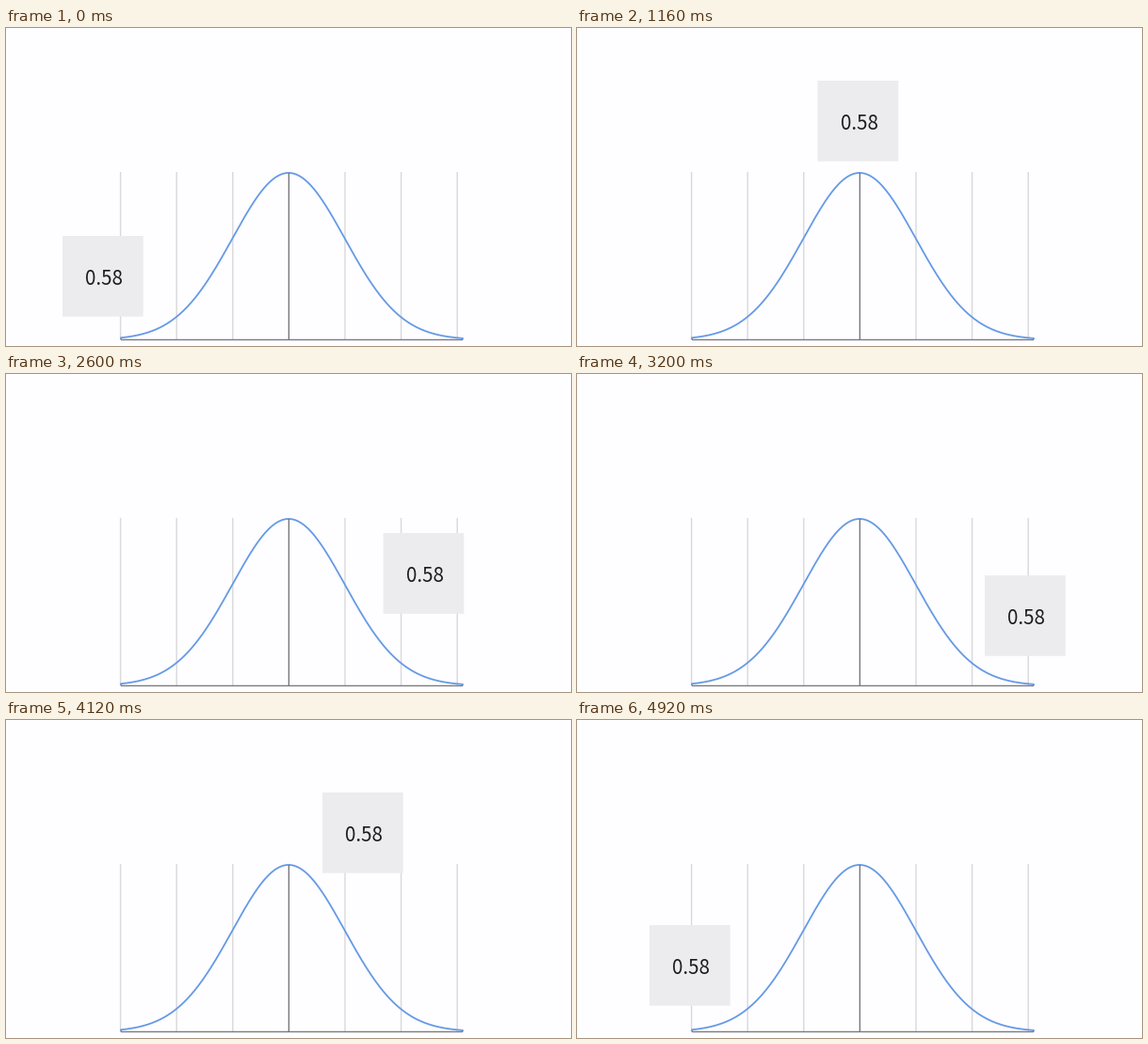
These frames come from a looping animation (600x338 px, 5.2 s). A matplotlib script:

```python
import numpy as np
import matplotlib.pyplot as plt
from matplotlib.animation import FuncAnimation
from matplotlib.patches import Rectangle

W, H, DPI = 600, 338, 100
STEP, FRAMES = 40, 130
SIDE = 85.7
BASE, PEAK, MID, SIGMA = 331.3, 154, 300.1, 59.7
LEFT, RIGHT = 122, 485
GREY, DARK, BLUE = "#d9d8db", "#77777b", "#659ae5"

# The card is dragged over the bell to the right and back: time in ms, left, top
KEYS = np.array([
    (0, 60, 221),
    (640, 186, 86),
    (1150, 254, 56),
    (1680, 347, 85),
    (2240, 388, 136),
    (2800, 408, 186),
    (3200, 433, 214),
    (3600, 463, 239),
    (4120, 336, 77),
    (4280, 273, 54),
    (4480, 200, 102),
    (4920, 77, 218),
])


def slopes(t, v):
    """Tangents that never overshoot the key values."""
    d = np.diff(v) / np.diff(t)
    a, b = d[:-1], d[1:]
    same = a * b > 0
    inner = np.where(same, 2 * a * b / np.where(same, a + b, 1), 0)
    return np.r_[d[0], inner, d[-1]]


def glide(t, v, at):
    """Cubic Hermite curve through the keys, held after the last one."""
    at = np.minimum(at, t[-1])
    m = slopes(t, v)
    i = np.clip(np.searchsorted(t, at, side="right") - 1, 0, len(t) - 2)
    h = t[i + 1] - t[i]
    s = (at - t[i]) / h
    return ((1 + 2 * s) * (1 - s) ** 2 * v[i] + s * (1 - s) ** 2 * h * m[i]
            + s * s * (3 - 2 * s) * v[i + 1] + s * s * (s - 1) * h * m[i + 1])


times = np.arange(FRAMES) * STEP
path_x = glide(KEYS[:, 0], KEYS[:, 1], times)
path_y = glide(KEYS[:, 0], KEYS[:, 2], times)

fig = plt.figure(figsize=(W / DPI, H / DPI), dpi=DPI, facecolor="#fefdff")
ax = fig.add_axes([0, 0, 1, 1])
ax.set_xlim(0, W)
ax.set_ylim(H, 0)
ax.axis("off")


def line(xs, ys, color, px):
    ax.plot(xs, ys, color=color, lw=px * 72 / DPI, snap=False,
            solid_capstyle="butt")


for k in range(-3, 4):
    x = 300.4 + 59.6 * k
    line([x, x], [153, 331], GREY, 1.4)

xs = np.linspace(LEFT, RIGHT, 400)
ys = BASE - (BASE - PEAK) * np.exp(-((xs - MID) / SIGMA) ** 2 / 2)
line(np.r_[LEFT, xs, RIGHT], np.r_[BASE, ys, BASE], BLUE, 1.8)
line([LEFT, RIGHT], [331.4, 331.4], DARK, 1.3)
line([300.4, 300.4], [154, 331], DARK, 1.3)

card = ax.add_patch(Rectangle((0, 0), SIDE, SIDE, fc="#ecebed", lw=0,
                              snap=False, zorder=4))
label = ax.text(0, 0, "0.58", family="Noto Sans CJK JP", size=20.5 * 72 / DPI,
                color="#1c1c1c", ha="center", va="baseline", zorder=5)


def draw(i):
    x, y = path_x[i], path_y[i]
    card.set_xy((x, y))
    label.set_position((x + 44.1, y + 52.3))
    return card, label


anim = FuncAnimation(fig, draw, frames=FRAMES, interval=STEP, repeat=True,
                     repeat_delay=0, blit=False)
plt.show()
```
